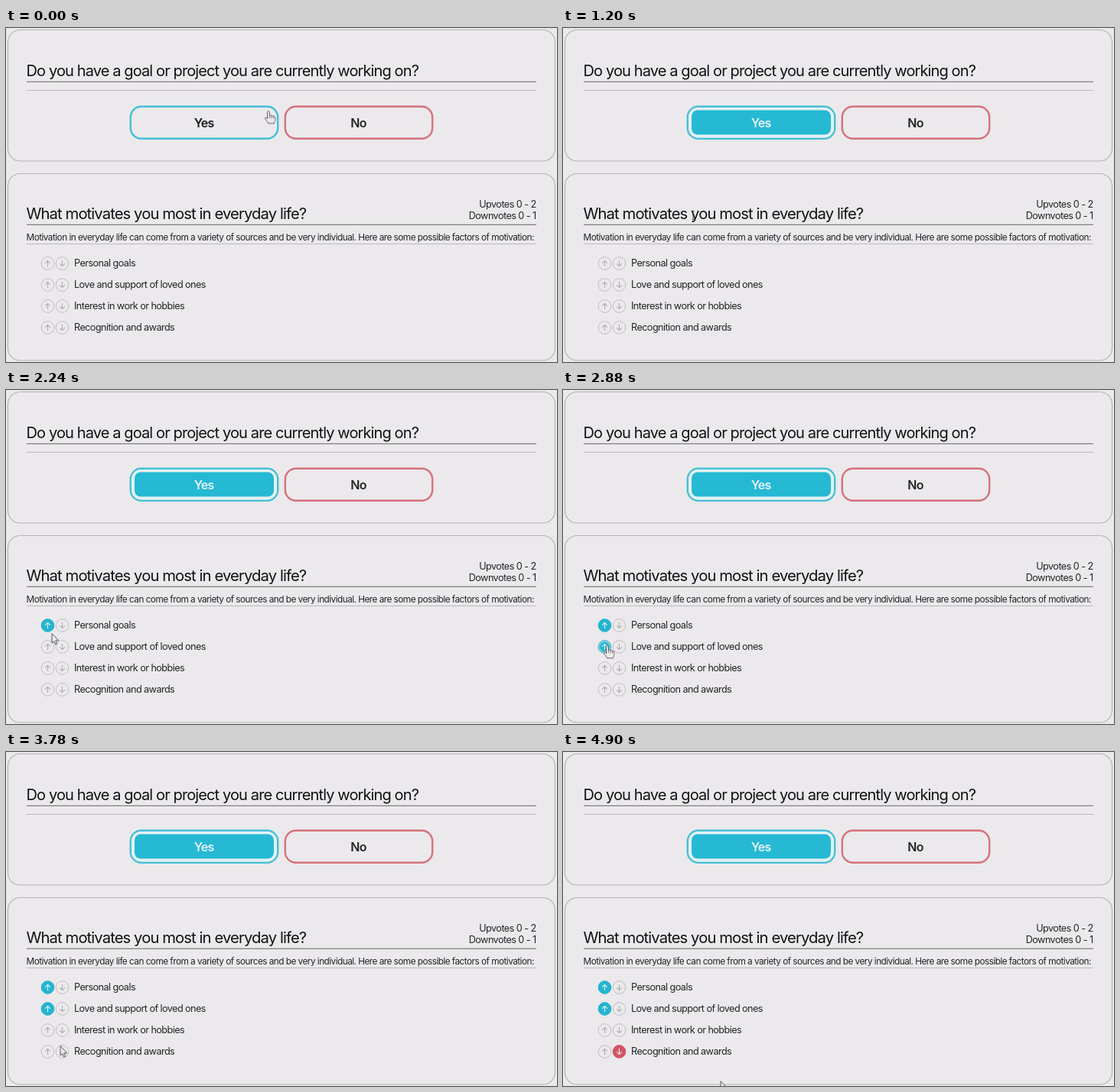
An HTML page that plays this animation: 720 px wide and 437 px high, repeating every 4.92 s.

```html
<!DOCTYPE html>
<html lang="en">
<head>
<meta charset="utf-8">
<title>Survey</title>
<style>
  html, body { margin: 0; width: 100%; height: 100%; overflow: hidden; background: #ebe9eb; }
  svg { display: block; width: 100vw; height: 100vh; }
  text {
    font-family: Inter, "Liberation Sans", sans-serif;
    font-optical-sizing: none;
    letter-spacing: -0.045em;
    fill: #242426;
  }
  .title { font-size: 20.06px; fill: #121214; }
  .topic { font-size: 20.26px; }
  .note { font-size: 11.8px; }
  .item { font-size: 12.66px; }
  .count { font-size: 12.68px; text-anchor: end; }
  .button { font-size: 16px; font-weight: 600; text-anchor: middle; }
  .card { fill: none; stroke: #b4b2b4; stroke-width: 1.2; }
  .rule { stroke: #817f81; stroke-width: 1.3; }
  .soft { stroke: #bcbabc; stroke-width: 1.1; }
  .arrow { fill: none; stroke-width: 1.1; stroke-linecap: round; stroke-linejoin: round; }
  .cursor path { fill: #eae8ea; stroke: #5a585c; stroke-linejoin: round; stroke-linecap: round; }
</style>
</head>
<body>
<svg id="stage" viewBox="0 0 720 437" preserveAspectRatio="none">
  <rect width="720" height="437" fill="#ebe9eb"/>
  <rect class="card" x="2.5" y="2.5" width="715" height="171.5" rx="16"/>
  <rect class="card" x="2.5" y="190.5" width="715" height="244.5" rx="16"/>

  <text class="title" x="26.5" y="62.8">Do you have a goal or project you are currently working on?</text>
  <path class="rule" d="M27 70.3H693"/>
  <path class="soft" d="M27 81.5H693"/>

  <rect x="162.8" y="102.8" width="192.4" height="42" rx="14" fill="none" stroke="#45bfd6" stroke-width="2.4"/>
  <g id="yesFill">
    <rect x="164" y="104" width="190" height="39.6" rx="13" fill="#e4f1f4"/>
    <rect x="168" y="107.5" width="182" height="32" rx="8" fill="#25b9d4"/>
  </g>
  <text id="yes" class="button" x="258.6" y="129.6">Yes</text>
  <rect x="364.8" y="102.8" width="192.4" height="42" rx="14" fill="none" stroke="#d5727b" stroke-width="2.4"/>
  <text class="button" x="460.6" y="129.6">No</text>

  <text class="title topic" x="26.5" y="249.8">What motivates you most in everyday life?</text>
  <text class="count" x="692.6" y="235">Upvotes 0 - 2</text>
  <text class="count" x="692.6" y="249.6">Downvotes 0 - 1</text>
  <path class="rule" d="M27 257.3H693"/>
  <text class="note" x="26.5" y="277.6">Motivation in everyday life can come from a variety of sources and be very individual. Here are some possible factors of motivation:</text>
  <path class="soft" d="M27 282.5H693"/>
  <g id="list"></g>

  <g id="cursor" class="cursor">
    <g id="hand" transform="translate(0 .8) scale(.92)">
      <path d="M-1.7 1.6C-1.7 -.6 1.5 -.6 1.5 1.6V6.2C2.2 5.2 4.2 5.4 4.4 6.8C5.2 6 7 6.3 7.1 7.7C8 7.1 9.6 7.5 9.6 9V12.6C9.6 14.5 8.3 15.2 8.1 17.4H-.4C-.7 15.4 -3.6 13 -4.8 10.6C-5.5 9.1 -3.8 8.2 -2.7 9.4L-1.7 10.5Z"/>
      <path d="M1.5 6.2V9.6M4.4 6.8V9.8M7.1 7.7V10" style="fill:none;stroke-width:.8"/>
    </g>
    <path id="pointer" d="M0 0V12.2L2.8 9.7L4.7 14L6.7 13.1L4.8 8.9H8.4Z"/>
    <path id="beam" d="M-1 -5.5H1M0 -5.5V5.5M-1 5.5H1" style="stroke:#333;stroke-width:.8"/>
  </g>
</svg>
<script>
  const LOOP = 4920;
  const CYAN = '#24b5d1', RED = '#d25566', GREY = '#bfbdbf';
  const NS = 'http://www.w3.org/2000/svg';
  const $ = id => document.getElementById(id);

  const labels = ['Personal goals', 'Love and support of loved ones',
                  'Interest in work or hobbies', 'Recognition and awards'];
  const columns = [54.5, 73.5];
  const rowY = row => 308 + row * 28;

  const yesClick = 640;
  const clicks = [
    { row: 0, col: 0, at: 1830, color: CYAN },
    { row: 1, col: 0, at: 2780, color: CYAN },
    { row: 3, col: 1, at: 4100, color: RED }
  ];

  // time, x, y of the cursor's hot spot
  const route = [
    [0, 343, 108], [380, 336, 116], [740, 336, 116], [1200, 170, 245],
    [1640, 57, 306], [2040, 57, 306], [2240, 60, 319], [2480, 58, 334],
    [3060, 58, 334], [3780, 71, 385], [3920, 73, 390], [4320, 73, 390],
    [4900, 206, 431], [LOOP, 207, 431]
  ];

  function make(tag, attrs, parent) {
    const el = document.createElementNS(NS, tag);
    for (const key in attrs) el.setAttribute(key, attrs[key]);
    return parent.appendChild(el);
  }

  function makeVote(row, col) {
    const g = make('g', { transform: `translate(${columns[col]} ${rowY(row)})` }, $('list'));
    const ring = make('circle', { r: 8.3, 'fill-opacity': 0.45, stroke: GREY }, g);
    const disc = make('circle', { r: 0 }, g);
    const d = col ? 'M0 -3.6V3.6M-3 .7L0 3.6L3 .7' : 'M0 3.6V-3.6M-3 -.7L0 -3.6L3 -.7';
    const arrow = make('path', { class: 'arrow', d }, g);
    return { ring, disc, arrow };
  }

  const votes = labels.map((label, row) => {
    make('text', { class: 'item', x: 89, y: rowY(row) + 4.4 }, $('list')).textContent = label;
    return columns.map((_, col) => makeVote(row, col));
  });

  const progress = (t, start, span) => Math.min(1, Math.max(0, (t - start) / span));
  const smooth = p => p * p * (3 - 2 * p);
  const mix = (a, b, p) => a + (b - a) * p;

  function place(t) {
    const i = route.findIndex(stop => stop[0] > t);
    const [t0, x0, y0] = route[i - 1], [t1, x1, y1] = route[i];
    const p = smooth((t - t0) / (t1 - t0));
    return [mix(x0, x1, p), mix(y0, y1, p)];
  }

  function cursorKind(x, y) {
    const onYes = x > 162 && x < 356 && y > 102 && y < 145;
    const onVote = labels.some((_, row) =>
      columns.some(cx => Math.hypot(x - cx, y - rowY(row)) < 7));
    if (onYes || onVote) return 'hand';
    const onText = (y > 232 && y < 255 && x < 393) || (y > 265 && y < 281);
    return onText && x > 27 ? 'beam' : 'pointer';
  }

  function paintVote({ ring, disc, arrow }, on, color, p) {
    ring.setAttribute('stroke', on ? color : GREY);
    ring.setAttribute('fill', on ? color : 'none');
    disc.setAttribute('fill', color);
    disc.setAttribute('r', on ? mix(4.2, 8.5, p) : 0);
    arrow.setAttribute('stroke', on ? '#e8f2f5' : '#b0aeb0');
  }

  function draw(t) {
    const lit = smooth(progress(t, yesClick, 200));
    $('yesFill').style.opacity = lit;
    $('yes').style.fill = `rgb(${mix(28, 230, lit)},${mix(28, 243, lit)},${mix(30, 247, lit)})`;

    votes.forEach((pair, row) => pair.forEach((vote, col) => {
      const click = clicks.find(c => c.row === row && c.col === col);
      const on = !!click && t >= click.at;
      paintVote(vote, on, on ? click.color : GREY, on ? progress(t, click.at, 200) : 0);
    }));

    const [x, y] = place(t);
    const kind = cursorKind(x, y);
    $('cursor').setAttribute('transform', `translate(${x} ${y})`);
    for (const id of ['hand', 'pointer', 'beam']) {
      $(id).style.display = id === kind ? '' : 'none';
    }
  }

  const begin = performance.now();
  function tick() {
    draw((performance.now() - begin) % LOOP);
    requestAnimationFrame(tick);
  }
  tick();
</script>
</body>
</html>
```
